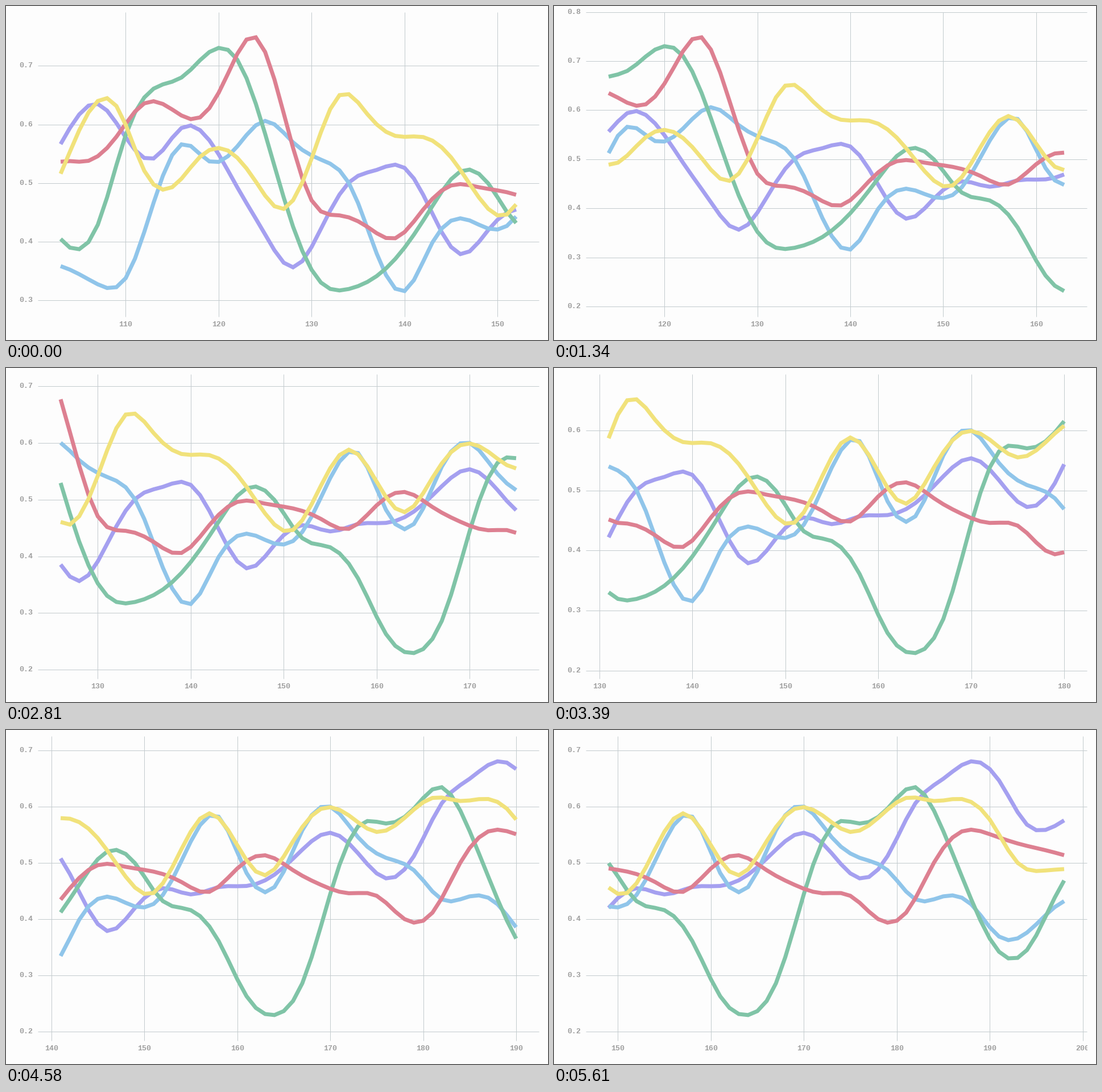
Write a matplotlib script that moves like this. It is 953x588 px and loops after 5.69 s.

```python
import matplotlib.pyplot as plt
import numpy as np
from matplotlib.animation import FuncAnimation
from matplotlib.patches import Rectangle

W, H, DPI = 953, 588, 64
PX = 72 / DPI                       # points per pixel
LOOP, FRAMES = 5690, 237
TICK, RATE, PHASE = 147.6, 1.21, 0.78
FIRST, LAST, WINDOW = 103, 198, 50
LEFT, RIGHT, TOP, BOTTOM = 56, 937, 10.5, 546.5
GRID, TEXT, BACK = "#c3cbce", "#a0a0a0", "#fdfdfd"
SPACING = 3


def curve(start, y):
    """Natural cubic spline through evenly spaced knots, sampled at whole steps."""
    y = np.array(y)
    n = len(y)
    m = np.zeros(n)
    band = 4 * np.eye(n - 2) + np.eye(n - 2, k=1) + np.eye(n - 2, k=-1)
    m[1:-1] = np.linalg.solve(band, 6 * np.diff(y, 2))
    pos = (np.arange(FIRST, LAST + 1) - start) / SPACING
    i = np.minimum(pos.astype(int), n - 2)
    u = pos - i
    v = 1 - u
    return v * y[i] + u * y[i + 1] + ((v**3 - v) * m[i] + (u**3 - u) * m[i + 1]) / 6


purple = curve(101, [
    .505, .594, .635, .578, .542, .594, .573, .493, .4125, .3565, .422, .501,
    .5225, .526, .448, .379, .420, .455, .444, .457, .459, .479, .5235, .5535,
    .517, .4725, .512, .606, .6495, .6805, .6465, .568, .5655, .600])
blue = curve(101, [
    .367, .3525, .3275, .338, .4665, .566, .537, .5625, .606, .5695, .540, .5005,
    .380, .316, .399, .440, .4225, .443, .538, .582, .482, .457, .558, .600,
    .5455, .509, .487, .435, .4405, .4265, .369, .376, .4215, .445])
green = curve(101, [
    .455, .390, .429, .582, .661, .680, .7235, .7105, .584, .426, .3305, .3195,
    .3415, .390, .461, .520, .4995, .432, .416, .361, .263, .2295, .286, .4445,
    .565, .570, .5965, .6345, .5565, .4355, .342, .345, .4385, .520])
red = curve(100, [
    .505, .5365, .538, .579, .636, .6255, .612, .6865, .7485, .619, .4705, .445,
    .4255, .406, .455, .496, .493, .4845, .466, .4485, .490, .5135, .487, .461,
    .446, .4415, .400, .4115, .5005, .556, .551, .5345, .5225, .509])
yellow = curve(100, [
    .420, .516, .6205, .6315, .521, .493, .545, .5555, .5025, .456, .542, .650,
    .6175, .5805, .5785, .544, .4755, .4465, .5245, .588, .5315, .478, .5385, .596,
    .5845, .555, .580, .6155, .610, .6135, .577, .500, .4865, .490])

data = np.array([purple, blue, green, red, yellow])
colors = ["#a5a0f0", "#90c5ea", "#80c4a7", "#dd8091", "#f1e27b"]

fig = plt.figure(figsize=(W / DPI, H / DPI), dpi=DPI, facecolor=BACK)
ax = fig.add_axes([0, 0, 1, 1])
ax.set_xlim(0, W)
ax.set_ylim(H, 0)
ax.axis("off")
label_area = Rectangle((0, 0), RIGHT + 1, H, transform=ax.transData)


def make_ticks(count, align):
    ticks = []
    for _ in range(count):
        rule, = ax.plot([], [], color=GRID, lw=PX, solid_capstyle="butt", zorder=1)
        label = ax.text(0, 0, "", color=TEXT, size=13.3 * PX, weight="bold",
                        family="Liberation Mono", ha=align, va="center")
        label.set_clip_path(label_area)
        label.set_clip_on(True)
        ticks.append((rule, label))
    return ticks


x_ticks = make_ticks(7, "center")
y_ticks = make_ticks(8, "right")
lines = [ax.plot([], [], color=c, lw=7 * PX, solid_capstyle="butt",
                 solid_joinstyle="miter", zorder=2)[0] for c in colors]


def inside(lo, hi, step):
    return step * np.arange(np.ceil(lo / step), np.floor(hi / step) + 1)


def set_ticks(ticks, values, place):
    for i, (rule, label) in enumerate(ticks):
        shown = i < len(values)
        rule.set_visible(shown)
        label.set_visible(shown)
        if shown:
            xs, ys, at, text = place(values[i])
            rule.set_data(xs, ys)
            label.set_position(at)
            label.set_text(text)


def update(frame):
    t = frame * LOOP / FRAMES
    step = int((t + 22) / TICK)
    shift = int(step * RATE + PHASE)
    view = data[:, shift:shift + WINDOW]
    x = FIRST + shift + np.arange(WINDOW)

    # The domain is the visible range plus 5 % across and 10 % up and down.
    pad_x = 0.05 * (WINDOW - 1)
    pad_y = 0.1 * np.ptp(view)
    x0, x1 = x[0] - pad_x, x[-1] + pad_x
    y0, y1 = view.min() - pad_y, view.max() + pad_y

    def sx(v):
        return LEFT + (v - x0) / (x1 - x0) * (RIGHT - LEFT)

    def sy(v):
        return BOTTOM - (v - y0) / (y1 - y0) * (BOTTOM - TOP)

    set_ticks(x_ticks, inside(x0, x1, 10),
              lambda v: ([sx(v)] * 2, [TOP, BOTTOM], (sx(v), 561), f"{v:.0f}"))
    set_ticks(y_ticks, inside(y0, y1, 0.1),
              lambda v: ([LEFT, RIGHT], [sy(v)] * 2, (47, sy(v)), f"{v:.1f}"))
    for line, values in zip(lines, view):
        line.set_data(sx(x), sy(values))
    return lines


anim = FuncAnimation(fig, update, frames=FRAMES, interval=LOOP / FRAMES,
                     repeat=True, repeat_delay=0, blit=False)
plt.show()
```
